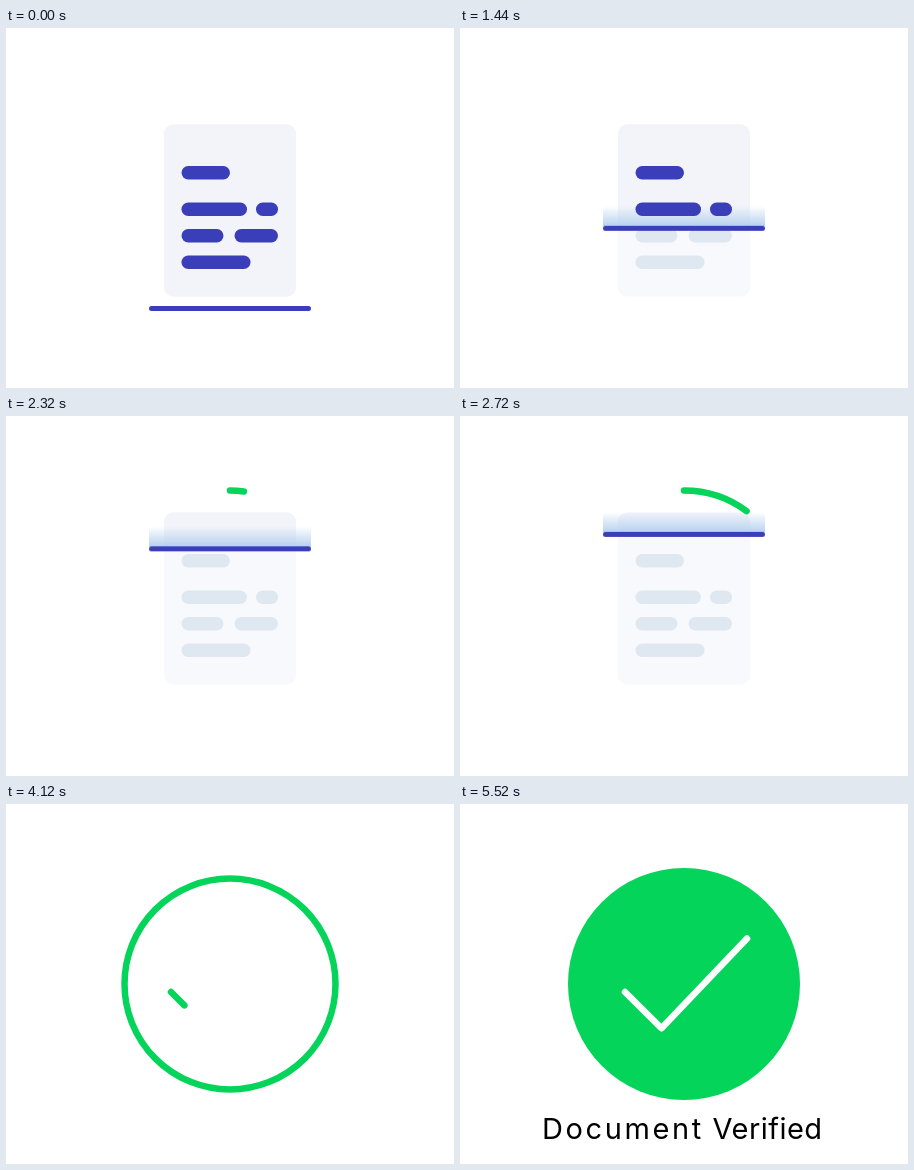
An HTML page that plays this animation: 448x360 px, repeating every 5600 ms.

```html
<!DOCTYPE html>
<html lang="en">
<head>
<meta charset="utf-8">
<title>Document Verified</title>
<style>
  html, body { margin: 0; width: 100%; height: 100%; overflow: hidden; background: #fff; }
  svg { display: block; width: 448px; height: 360px; }

  .scan, .glow, .doc, .ring, .tick, .fill, .word { animation: 5600ms linear infinite; }

  .scan { animation-name: scan; }
  .glow { animation-name: glow; }
  .doc  { animation-name: doc; }
  .ring { animation-name: ring; }
  .tick { animation-name: tick; }
  .fill { animation-name: fill; transform-origin: 224px 180px; }
  .first  { animation-name: first; letter-spacing: 2.6px; }
  .second { animation-name: second; letter-spacing: .5px; }

  .page { fill: #f3f4fa; }
  .bars { fill: #3a3eb8; }
  .faded .page { fill: #f8f9fc; }
  .faded .bars { fill: #dfe8f1; }
  .stroke { fill: none; stroke: #04d45a; stroke-width: 6.5; stroke-linecap: round; stroke-linejoin: round; }
  .ring, .tick { stroke-dasharray: 1 2; }
  .white { stroke: #fff; }
  .word { font: 400 29px Inter, "Open Sans", sans-serif; fill: #000; }

  @keyframes scan {
    0% { transform: translateY(0); animation-timing-function: cubic-bezier(.37, 0, .63, 1); }
    52.2%, 100% { transform: translateY(-164px); }
  }
  @keyframes glow {
    0% { opacity: 0; }
    14.3%, 100% { opacity: 1; }
  }
  @keyframes doc {
    0%, 50% { opacity: 1; }
    55.7%, 100% { opacity: 0; }
  }
  @keyframes ring {
    0%, 34.99% { stroke-dashoffset: 1; visibility: hidden; }
    35% { stroke-dashoffset: 1; visibility: visible; animation-timing-function: cubic-bezier(.5, 0, .8, .5); }
    72.14%, 100% { stroke-dashoffset: 0; visibility: visible; }
  }
  @keyframes tick {
    0%, 72.13% { stroke-dashoffset: 1; visibility: hidden; }
    72.14% { stroke-dashoffset: 1; visibility: visible; animation-timing-function: cubic-bezier(.3, 0, .6, 1); }
    80%, 100% { stroke-dashoffset: 0; visibility: visible; }
  }
  @keyframes fill {
    0%, 90.7% { transform: scale(0); animation-timing-function: cubic-bezier(.33, 0, .67, 1); }
    97.8%, 100% { transform: scale(1); }
  }
  @keyframes first {
    0%, 84.3% { opacity: 0; }
    87.1%, 100% { opacity: 1; }
  }
  @keyframes second {
    0%, 87.5% { opacity: 0; }
    91%, 100% { opacity: 1; }
  }
</style>
</head>
<body>
<svg viewBox="0 0 448 360">
  <defs>
    <linearGradient id="beam" x1="0" y1="0" x2="0" y2="1">
      <stop offset="0" stop-color="#b4d0ee" stop-opacity="0"/>
      <stop offset="1" stop-color="#b4d0ee"/>
    </linearGradient>
    <clipPath id="above"><rect class="scan" x="100" y="-60" width="250" height="340.5"/></clipPath>
    <clipPath id="disc"><circle class="fill" cx="224" cy="180" r="116"/></clipPath>
    <rect id="page" x="158" y="96.5" width="132" height="172" rx="9"/>
    <g id="bars">
      <rect x="175.5" y="138" width="48.5" height="13.4" rx="6.7"/>
      <rect x="175.5" y="174.6" width="65.5" height="13.4" rx="6.7"/>
      <rect x="250" y="174.6" width="22" height="13.4" rx="6.7"/>
      <rect x="175.5" y="201" width="42" height="13.4" rx="6.7"/>
      <rect x="228.5" y="201" width="43.5" height="13.4" rx="6.7"/>
      <rect x="175.5" y="227.5" width="69" height="13.4" rx="6.7"/>
    </g>
    <path id="check" d="M165 188 L201.5 224.3 L287 134.5" pathLength="1"/>
  </defs>

  <g class="doc">
    <g class="faded">
      <use href="#page" class="page"/>
      <use href="#bars" class="bars"/>
    </g>
    <use href="#page" class="page" clip-path="url(#above)"/>
    <g class="scan">
      <rect class="glow" x="143" y="258" width="162" height="21" fill="url(#beam)"/>
    </g>
    <use href="#bars" class="bars" clip-path="url(#above)"/>
    <rect class="scan bars" x="143" y="278" width="162" height="5" rx="2.5"/>
  </g>

  <path class="stroke ring" d="M224 74.5 a105.5 105.5 0 0 1 0 211 a105.5 105.5 0 0 1 0 -211" pathLength="1"/>
  <use href="#check" class="stroke tick"/>
  <circle class="fill" cx="224" cy="180" r="116" fill="#04d45a"/>
  <g clip-path="url(#disc)"><use href="#check" class="stroke white"/></g>

  <text class="word first" x="82" y="334.7">Document</text>
  <text class="word second" x="252.5" y="334.7">Verified</text>
</svg>
</body>
</html>
```
